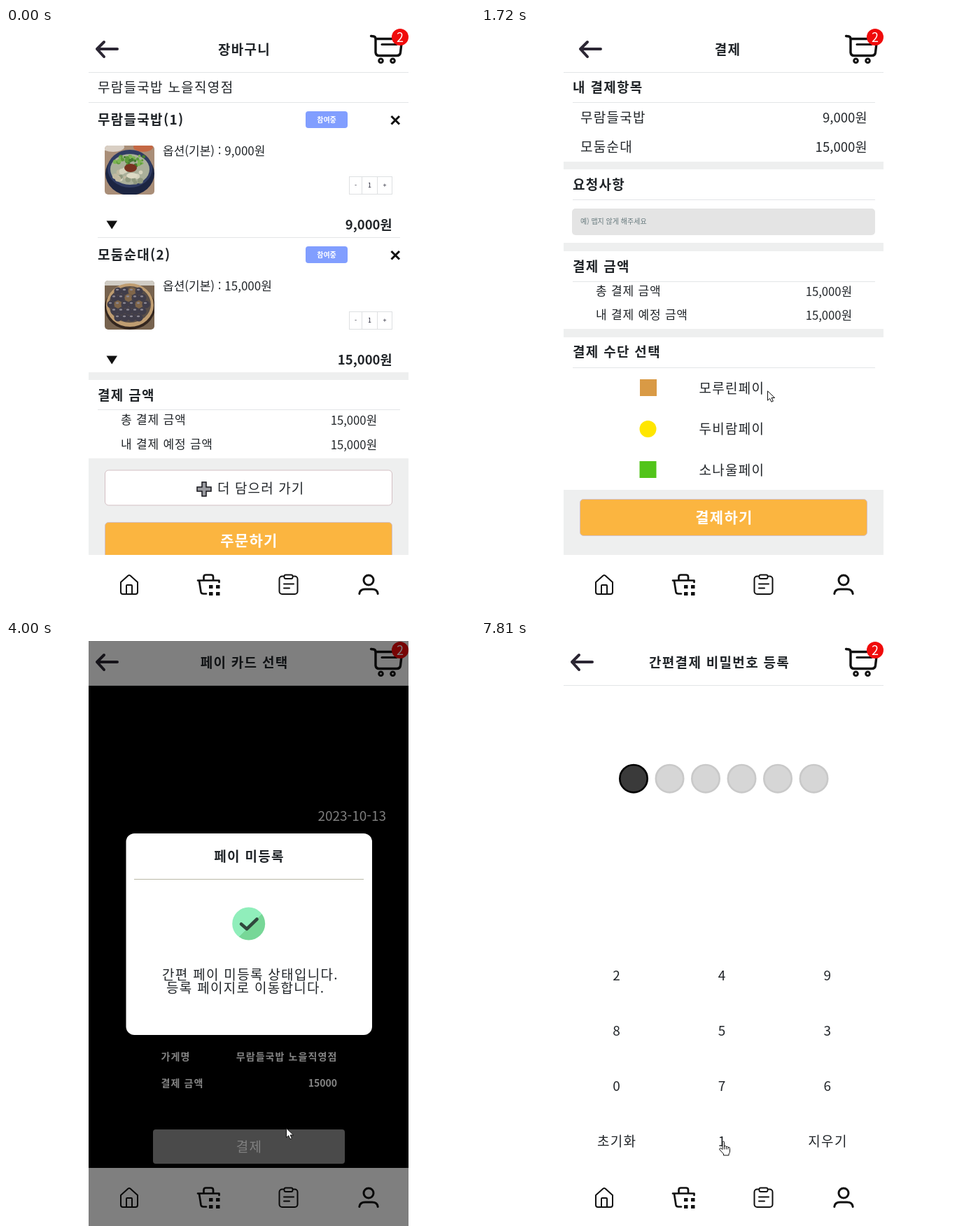
An HTML page that plays this animation: 670x836 px, repeating every 8 s.

```html
<!DOCTYPE html>
<html lang="ko">
<head>
<meta charset="utf-8">
<title>장바구니 결제</title>
<style>
  html, body { margin: 0; width: 100%; height: 100%; overflow: hidden; background: #fff; }
  svg { display: block; width: 670px; height: 836px; }
  text { font-family: "Noto Sans CJK KR", "Noto Sans KR", sans-serif; }
  .page { visibility: hidden; }
  .page.on { visibility: visible; }
  .line { fill: none; stroke: #111; stroke-linecap: round; stroke-linejoin: round; }
</style>
</head>
<body>
<svg id="stage" viewBox="0 0 670 836"></svg>
<script>
const SHOP = '무람들국밥', STORE = SHOP + ' 노을직영점';
const BAND = '#eeefef', ORANGE = '#fbb540', BORDER = '#d3bfc3';

// Text is placed by its vertical centre.
function text(x, cy, str, size = 19, o = {}) {
  const { bold, anchor = 'start', ls = 0, fill = '#212529' } = o;
  return `<text x="${x}" y="${cy + size * .37}" font-size="${size}" font-weight="${bold ? 700 : 350}"
    text-anchor="${anchor}" letter-spacing="${ls}" fill="${fill}">${str}</text>`;
}
const label = (x, cy, str, o) => text(x, cy, str, 19, { ls: 1.3, ...o });
const head = (x, cy, str, o) => label(x, cy, str, { bold: true, ...o });
const mid = (x, cy, str, o) => label(x + .6, cy, str, { anchor: 'middle', ...o });
const price = (x, cy, str, size = 16.7, o) => text(x, cy, str, size, { anchor: 'end', ...o });
const rect = (x, y, w, h, fill, r = 0, extra = '') =>
  `<rect x="${x}" y="${y}" width="${w}" height="${h}" rx="${r}" fill="${fill}" ${extra}/>`;
const circle = (x, y, r, fill, extra = '') => `<circle cx="${x}" cy="${y}" r="${r}" fill="${fill}" ${extra}/>`;
const oval = (x, y, rx, ry, fill) => `<ellipse cx="${x}" cy="${y}" rx="${rx}" ry="${ry}" fill="${fill}"/>`;
const line = (d, w, color = '#111') => `<path class="line" d="${d}" style="stroke:${color};stroke-width:${w}"/>`;
const rule = (y, x = 131, x2 = 563) => rect(x, y, x2 - x, 1, '#e3e5e7');
const band = (y, h) => rect(118, y, 457, h, BAND);
const button = (y, h, str) =>
  rect(141.5, y + .5, 410, h - 1, ORANGE, 5, `stroke="${BORDER}"`) +
  text(347.5, y + 26.5, str, 21, { bold: true, ls: 1.3, anchor: 'middle', fill: '#fff' });

function header(title, cx, ax = 128) {
  const wheel = x => circle(x, 46.7, 2.8, '#fff', 'stroke="#111" stroke-width="3"');
  return rect(118, 0, 457, 63, '#fff') + rule(63, 118, 575) +
    line(`M${ax + 31} 30H${ax + 2}M${ax + 12} 20L${ax + 2} 30L${ax + 12} 41`, 4, '#2b2633') +
    mid(cx, 31, title, { bold: true }) +
    line('M521.5 11.5L525.5 12Q528 12.500 528 16V35Q528.500 39.500 533 39.500H558Q563 39.500 563.500 35L565 22M529 15.500H551', 3.4) +
    line('M537 23.500H558', 3) + wheel(535.5) + wheel(552.5) +
    circle(563, 13, 12, '#f00b0b') + text(563, 13.5, '2', 18, { anchor: 'middle', fill: '#fff' });
}

function nav() {
  const dots = [[290, 796], [300, 796], [290, 806], [300, 806]];
  return rect(118, 753, 457, 83, '#fff') +
    line('M164 792L174.500 782.500Q176 781.500 177.500 782.500L188 792V806Q188 809 185 809H167Q164 809 164 806ZM172 809V797Q172 796 173 796H179Q180 796 180 797V809', 2) +
    line('M274 789.500H304.500V792M276 790L278.500 806Q279 808.500 282 808.500H286M282.500 789V784.500Q282.500 781.500 285.500 781.500H293Q296 781.500 296 784.500V789', 2.7) +
    dots.map(([x, y]) => rect(x, y, 5.5, 5, '#111', .5)).join('') +
    rect(390.5, 783.5, 26, 25.5, 'none', 4, 'stroke="#111" stroke-width="2"') +
    rect(397.5, 781.5, 12, 5.5, '#fff', 2, 'stroke="#111" stroke-width="1.8"') +
    line('M397 794.500H411M397 800.500H405', 2) +
    circle(518, 789, 7, 'none', 'stroke="#111" stroke-width="3"') +
    line('M504.800 808.500Q505.500 802 513 802H523Q530.500 802 531.200 808.500', 3);
}

const clipPhoto = (id, y, art) =>
  `<clipPath id="${id}">${rect(141, y, 71, 70, '#000', 5)}</clipPath>
   <g clip-path="url(#${id})"><g transform="translate(141 ${y})">${art}</g></g>`;

function seeded(seed) {
  return () => (seed = seed * 16807 % 2147483647) / 2147483647;
}
function scatter(n, seed, cx, cy, rx, ry, size, colors) {
  const rnd = seeded(seed);
  let s = '';
  for (let i = 0; i < n; i++) {
    const a = rnd() * 6.283, d = Math.sqrt(rnd());
    s += circle((cx + rx * d * Math.cos(a)).toFixed(1), (cy + ry * d * Math.sin(a)).toFixed(1),
      (size * (.6 + rnd() * .6)).toFixed(1), colors[i % colors.length]);
  }
  return s;
}

const soup = rect(0, 0, 71, 70, '#a98e78') + oval(12, 2, 16, 7, '#d9cfc4') + oval(55, 2, 14, 7, '#c46844') +
  oval(36, 40, 35, 31, '#1c2542') + oval(36, 33, 32, 27, '#303c63') + oval(36, 34, 28, 22, '#aab09a') +
  scatter(16, 9, 36, 44, 24, 10, 3.5, ['#d5d3bd', '#8f987e', '#c2baa0']) +
  scatter(36, 4, 37, 21, 23, 9, 2.6, ['#5d9a3b', '#7db653', '#457c30']) +
  oval(37, 32, 9, 6, '#78321f') + oval(39, 43, 8, 4, '#dedbc5');

function dumplings() {
  let s = rect(0, 0, 71, 70, '#77634f') + rect(0, 0, 71, 7, '#d0ccc4') + oval(36, 38, 36, 32, '#33261f') +
    oval(36, 35, 34, 31, '#bf9d71') + oval(36, 34, 30, 26, '#574d48');
  for (let r = 0; r < 5; r++)
    for (let c = 0; c < 6; c++) {
      const x = 9 + r % 2 * 5 + c * 10, y = 15 + r * 9.5;
      if (Math.hypot((x - 36) / 29, (y - 34) / 25) > 1) continue;
      s += oval(x, y, 5.6, 5.4, (r + c) % 3 || r > 2 ? '#403d4a' : '#80664a') + oval(x - 1, y - 2, 2.2, 1.3, '#8b8792');
    }
  return s;
}

function cartItem(y, name, cost, id, art) {
  const tiny = (x, str) => text(x, y + 93.5, str, 9, { anchor: 'middle', fill: '#223' });
  return head(131, y, name) +
    rect(428, y - 12, 60, 24, '#819eff', 4) +
    text(458, y, '참여중', 10, { bold: true, anchor: 'middle', fill: '#fff' }) +
    `<path d="M550.500 ${y - 5}L562 ${y + 6.5}M562 ${y - 5}L550.500 ${y + 6.5}" stroke="#111" stroke-width="3"/>` +
    clipPhoto(id, y + 37, art) +
    text(224, y + 45, `옵션(기본) : ${cost}`, 17) +
    rect(490.5, y + 81.5, 61, 25, '#fff', 0, 'stroke="#dee0e2"') +
    rect(508, y + 81, 1, 26, '#dee0e2') + rect(530, y + 81, 1, 26, '#dee0e2') +
    tiny(499.5, '-') + tiny(519.5, '1') + tiny(541, '+') +
    `<path d="M143.500 ${y + 144.5}h15.500l-7.750 12z" fill="#111"/>` +
    price(551.5, y + 150, cost, 18.5, { bold: true });
}

const totals = (y1, y2) =>
  text(164, y1, '총 결제 금액', 17, { ls: .8 }) + price(530, y1 + .5, '15,000원') +
  text(164, y2, '내 결제 예정 금액', 17, { ls: .8 }) + price(530, y2 + .5, '15,000원');

const cart = () =>
  label(131, 84.5, STORE) + rule(106, 118, 575) +
  cartItem(131, SHOP + '(1)', '9,000원', 'soup', soup) + rule(299) +
  cartItem(324, '모둠순대(2)', '15,000원', 'dish', dumplings()) +
  band(492, 11) + head(131, 524.5, '결제 금액') + rule(545) + totals(560, 595) +
  band(615, 138) + rect(141.5, 632, 410, 50, '#fff', 5, `stroke="${BORDER}"`) +
  '<path d="M280 649h6v7h7v6h-7v7h-6v-7h-7v-6h7z" fill="#9a9ba0" stroke="#15151a" stroke-width="1.5"/>' +
  text(302, 658, '더 담으러 가기', 19, { ls: 1.1 }) + button(706, 54, '주문하기') +
  header('장바구니', 340) + nav();

const payment = () =>
  head(131, 84.5, '내 결제항목') + rule(106) +
  label(142, 127.5, SHOP) + price(551.5, 128, '9,000원', 18.6) +
  label(142, 169.5, '모둠순대') + price(551.5, 170, '15,000원', 18.6) +
  band(191, 11) + head(131, 224, '요청사항') + rule(245) +
  rect(130, 258, 433, 38, '#e4e4e4', 5) + text(142, 276.5, '예) 맵지 않게 해주세요', 10, { fill: '#66797d' }) +
  band(307, 12) + head(131, 340.5, '결제 금액') + rule(362) + totals(376, 410) +
  band(430, 12) + head(131, 463, '결제 수단 선택') + rule(485) +
  `<g id="chosen">${rect(118, 485.5, 457, 58, '#e0dfcd')}</g>` +
  rect(209, 502, 59, 24, '#fff') + rect(227, 502, 24, 24, '#d99a45') + label(311.5, 514.5, '모루린페이') +
  circle(238.5, 573, 12, '#ffe600') + label(311.5, 572.5, '두비람페이') +
  rect(226.5, 619, 24, 24, '#52c41a') + label(311.5, 631.5, '소나울페이') +
  band(660, 93) + button(673, 53, '결제하기') +
  header('결제', 352, 140) + nav();

function notice() {
  const gray = { bold: true, ls: 1.1, fill: '#858585' };
  return header('페이 카드 선택', 340) + nav() +
    rect(118, 0, 457, 836, '#000', 0, 'opacity=".5"') + rect(118, 64, 457, 689, '#000') +
    price(543, 249.5, '2023-10-13', 19, { fill: '#7f7f7f' }) +
    text(221.5, 594, '가게명', 14, gray) + text(473.5, 594, STORE, 14, { ...gray, anchor: 'end' }) +
    text(221.5, 632, '결제 금액', 14, gray) + price(473, 632, '15000', 14, { bold: true, fill: '#858585' }) +
    rect(210, 698, 274, 49, '#4a4a4a', 4) + mid(347, 722.5, '결제', { fill: '#818181' }) +
    rect(171.5, 275, 351.5, 288, '#fff', 12) + mid(347, 307.5, '페이 미등록', { bold: true }) +
    rect(183, 340, 328, 1, '#b9b8a6') +
    circle(346.7, 404, 23.5, 'url(#mint)') + line('M336 404.500L344 411.500L358.500 397.500', 4.6, '#30483d') +
    text(223, 477, '간편 페이 미등록 상태입니다.', 19, { ls: 1.3 }) +
    text(229, 495.5, '등록 페이지로 이동합니다.', 19, { ls: 1.3 });
}

function keypad() {
  const rows = [['2', '4', '9'], ['8', '5', '3'], ['0', '7', '6'], ['초기화', '1', '지우기']];
  let s = header('간편결제 비밀번호 등록', 340);
  for (let i = 0; i < 6; i++)
    s += circle(218 + i * 51.5, 196.7, 19.7, '#d6d6d6', `stroke="#c9c9c9" stroke-width="2.6" ${i ? '' : 'id="first"'}`);
  rows.forEach((row, r) => row.forEach((key, c) => { s += mid(193.5 + c * 150.7, 478 + r * 79, key); }));
  return s + nav();
}

const pages = { cart, payment, notice, keypad };
const stage = document.getElementById('stage');
stage.innerHTML =
  `<defs><linearGradient id="mint" x2="1" y2="1"><stop offset=".55" stop-color="#90eebb"/>
   <stop offset=".55" stop-color="#77d797"/></linearGradient></defs>` +
  rect(0, 0, 670, 836, '#fff') +
  Object.keys(pages).map(k => `<g class="page" id="${k}">${pages[k]()}</g>`).join('') +
  `<path id="arrow" d="M.500 .800V14.200L3.600 11.300L5.900 16.300L8.400 15.200L6.100 10.500H10.600Z" fill="#fff" stroke="#111"/>
   <path id="hand" d="M5 12V2.200Q5 .600 6.300 .600T7.600 2.200V7.500Q9.800 6.300 10.300 8Q12.300 7.200 12.900 8.900Q15.500 8.300 15.500 11V14.500Q15.500 17 14 18.500V20.500H6.500V18.500L1 12.500Q.200 11 1.600 10.300T5 12.300M7.600 7.500V12M10.300 8V12M12.900 9V12" fill="#fff" stroke="#111"/>`;

// start, page, pointer, x, y
const LOOP = 8000;
const steps = [
  [0, 'cart'],
  [200, 'cart', 'arrow', 432, 724],
  [960, 'payment', 'arrow', 432, 724],
  [1720, 'payment', 'arrow', 409, 518],
  [2480, 'payment', 'arrow', 400, 665],
  [3240, 'notice', 'arrow', 400, 696.5],
  [4000, 'notice', 'arrow', 400, 695.5],
  [6280, 'keypad', 'hand', 394, 693],
  [7040, 'keypad', 'hand', 339, 635],
  [7810, 'keypad', 'hand', 340, 714.5]
];
const $ = id => document.getElementById(id);
const began = performance.now();

function draw(now) {
  const t = Math.max(0, now - began) % LOOP;
  const [start, page, pointer, x, y] = steps.filter(s => s[0] <= t).pop();
  for (const k in pages) $(k).classList.toggle('on', k === page);
  for (const k of ['arrow', 'hand']) {
    $(k).style.display = k === pointer ? '' : 'none';
    if (k === pointer) $(k).setAttribute('transform', `translate(${x} ${y})`);
  }
  $('chosen').style.display = start >= 2480 ? '' : 'none';
  const typed = start >= 7810;
  $('first').setAttribute('fill', typed ? '#3a3a3a' : '#d6d6d6');
  $('first').setAttribute('stroke', typed ? '#000' : '#c9c9c9');
  requestAnimationFrame(draw);
}
draw(began);
</script>
</body>
</html>
```
